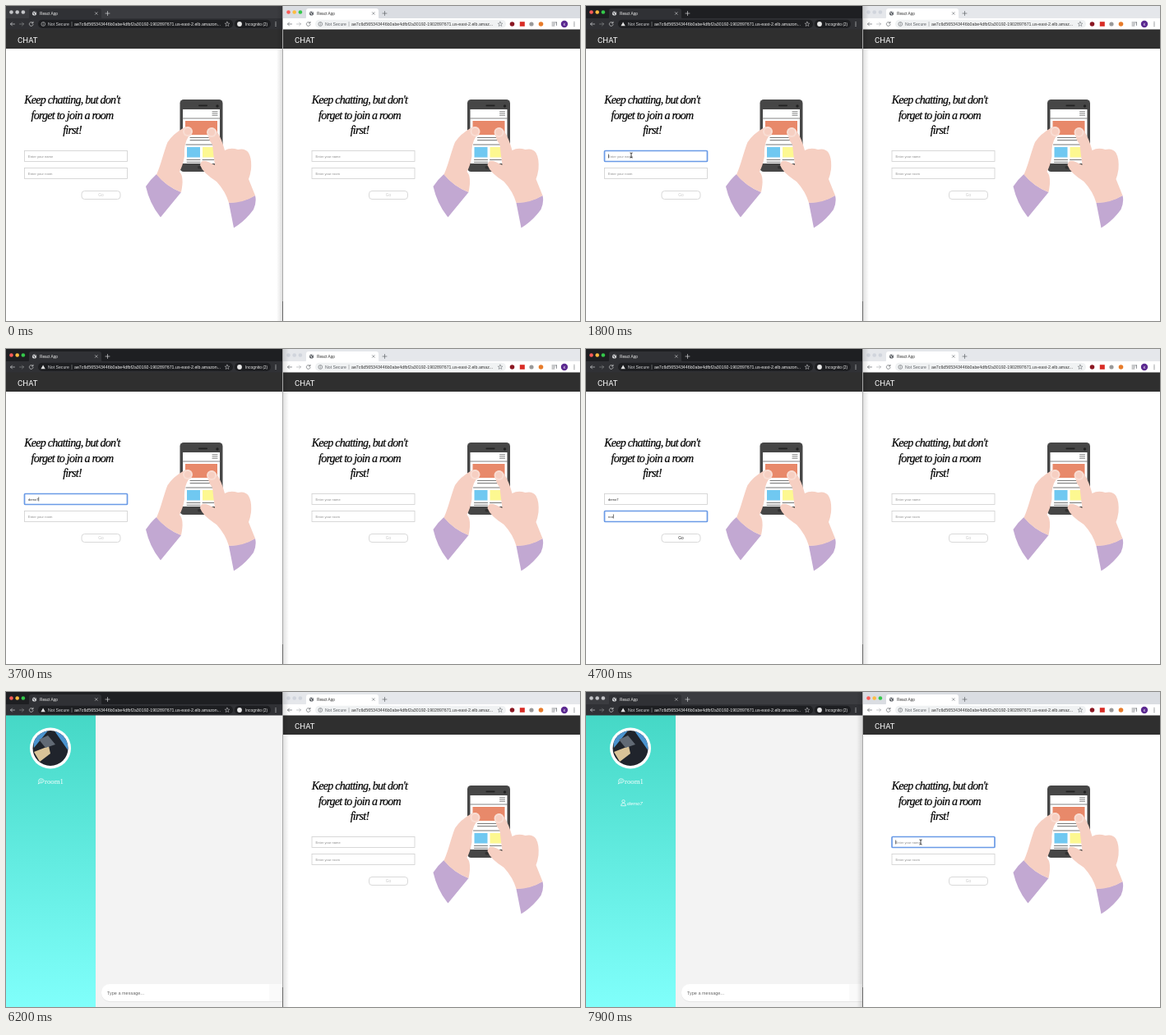
An HTML page for the animation above (8000 ms loop, 698 by 384 pixels).

```html
<!DOCTYPE html>
<html lang="en">
<head>
<meta charset="utf-8">
<title>Chat rooms</title>
<style>
  html, body { margin: 0; width: 100%; height: 100%; overflow: hidden; background: #fff; }
  svg { display: block; width: 698px; height: 384px; }
  text { font-family: "Liberation Sans", Arial, sans-serif; white-space: pre; }
  .bar { font-family: Roboto, sans-serif; font-size: 9.6px; fill: #fff; }
  .script text { font: italic 14px "Liberation Serif", serif; letter-spacing: -.75px; fill: #000; stroke: #000; stroke-width: .2; }
  .room { font-family: "Liberation Serif", serif; font-size: 8.8px; fill: #fff; }
  .line { fill: none; stroke-linecap: round; stroke-linejoin: round; }
</style>
</head>
<body>
<svg id="stage" viewBox="0 0 698 384" xmlns="http://www.w3.org/2000/svg"></svg>
<script>
const LOOP = 8000, STEP = 100;
const NAME = "demo7", ROOM = "room1";
const HOST = "ae7c6d565343446b0abe4dfbf2a30192-1902897671.us-east-2.elb.amaz";
const LIGHTS = ["#fc5b57", "#fdbc40", "#34c84a"];

// Times of the clicks, key presses and page changes, in ms
const leftClick = 1400, tabKey = 4000, enterChat = 6200, userJoins = 6400;
const rightActive = 7300, rightClick = 7500;
const nameKeys = [2900, 3000, 3200, 3300, 3600];
const roomKeys = [4400, 4600, 4700, 4900, 5700];

const rect = (x, y, w, h, fill, more = "") =>
  `<rect x="${x}" y="${y}" width="${w}" height="${h}" fill="${fill}" ${more}/>`;
const dot = (x, y, r, fill, more = "") =>
  `<circle cx="${x}" cy="${y}" r="${r}" fill="${fill}" ${more}/>`;
const label = (x, y, size, fill, str, more = "") =>
  `<text x="${x}" y="${y}" font-size="${size}" fill="${fill}" ${more}>${str}</text>`;
const shape = (d, fill, more = "") => `<path d="${d}" fill="${fill}" ${more}/>`;
const line = (d, color, w = .7, more = "") =>
  `<path class="line" d="${d}" stroke="${color}" stroke-width="${w}" ${more}/>`;

function phone() {
  const skin = "#f6cfc2", sleeve = "#c2a8d2", ink = "#464646";
  return rect(211.5, 114, 52, 88, ink, 'rx="4.5"') +
    rect(234, 120.5, 11, 1.7, "#222", 'rx=".8"') + dot(257, 122, 1.7, "#222") +
    rect(215, 126, 45, 66, "#fff") +
    line("M251 128.8h6M251 131h6M251 133.2h6", "#888", 1.1) +
    line("M215 137h45", "#777", .9) +
    rect(218, 140, 39, 17, "#e8896a") +
    line("M224 160.5h25M224 163.5h25M219 169h34", "#555", .8) +
    rect(220, 172, 16, 12.5, "#70c8f1") + rect(239, 172, 14, 12.5, "#fdf891") +
    line("M220 187.5h16M239 187.5h14M220 190.3h16", "#555", .8) +
    rect(233, 195, 9, 3.5, "#333", 'rx="1.7"') +
    shape("M183 205Q176 211 170 220Q175 242 188 257.5L213 227Q195 220 183 205Z", sleeve) +
    shape("M183 205.5C189 192 192 177 196.5 166Q203 156 216 148.5Q222 146 225 149Q228 155 222 159Q216 168 217 183Q215 195 211 202Q217 208 213 227Q195 220 183 205.5Z", skin) +
    dot(221, 153, 6, "#f9ddd3") + dot(221, 153, 4, skin) +
    shape("M271 240Q289 239 303 231Q305 239 301 248Q291 262 277 270.5Z", sleeve) +
    shape("M245 151Q251 145 256 152Q262 161 266 176Q273 172 282 175Q291 173 295 179Q299 186 298 199Q297 206 295 211L303 231Q289 240 271 240Q267 226 256 214Q239 203 236 194Q237 186 246 190L254 194Q252 180 251 169Q245 162 245 151Z", skin) +
    dot(250, 154, 6, "#f9ddd3") + dot(250, 154, 4, skin);
}

function field(id, y, hint) {
  return `<rect id="${id}Box" x="22.5" y="${y}" width="125" height="13" fill="#fff"/>` +
    label(27, y + 8.2, 4.1, "#888", hint, `id="${id}Text"`) +
    `<rect id="${id}Caret" x="27" y="${y + 4}" width=".6" height="5" fill="#111"/>`;
}

function landing(side, x, offset) {
  const heading = ["Keep chatting, but don't", "forget to join a room", "first!"]
    .map((s, i) => `<text x="80.5" y="${119 + i * 18.5}" text-anchor="middle">${s}</text>`).join("");
  return rect(x, 28, 362, 356, "#fff") + rect(x, 28, 362, 24, "#2f2f2f") +
    `<text class="bar" x="${x + 14}" y="44.5">CHAT</text>` +
    `<g transform="translate(${offset})"><g class="script">${heading}</g>` +
    field(side + "Name", 176.5, "Enter your name") + field(side + "Room", 197.5, "Enter your room") +
    rect(92, 225.5, 47, 10, "#fff", 'rx="3.5" stroke="#d0d0d0" stroke-width=".8"') +
    label(115.5, 232.3, 4.8, "#c8c8c8", "Go", `id="${side}Go" text-anchor="middle"`) +
    phone() + "</g>";
}

function chat() {
  return `<g id="chat">` + rect(0, 28, 336, 356, "#f3f3f3") + rect(0, 28, 109, 356, "url(#sea)") +
    dot(54, 68.5, 25, "#fff") +
    `<g clip-path="url(#face)">` + rect(32, 46, 44, 46, "#20242c") +
    shape("M32 46H52L34 68ZM58 46H76V72Z", "#4c94cf") +
    shape("M34 73L52 66L54 75L41 85Z", "#d9c398") +
    shape("M40 58L51 53L60 64L48 68Z", "#626a75") + "</g>" +
    line("M40 110.5Q38.5 105.8 42.5 105.8Q46.5 106 46 109Q44 111.4 41.5 110.8L39.3 111.8Z", "#fff", .7) +
    line("M41.2 107.8h3.4M41.2 109.2h2.6", "#fff", .4) +
    `<text class="room" x="47" y="111.8">${ROOM}</text>` +
    `<g id="member">` + dot(45.5, 133.2, 1.7, "none", 'stroke="#fff" stroke-width=".7"') +
    line("M42.6 138.3Q42.6 135.4 45.5 135.4Q48.4 135.4 48.4 138.3Z", "#fff") +
    label(50, 138, 6.2, "#fff", NAME, 'font-style="italic"') + "</g>" +
    rect(116, 357, 240, 21, "#e6e6e6", 'rx="10"') +
    rect(116, 356, 240, 21, "#fff", 'rx="10"') + rect(320, 356, 16, 21, "#fafafa") +
    label(123, 368.8, 5.5, "#666", "Type a message...") + "</g>";
}

function globe(x, color, land) {
  return dot(x, 9, 2.6, color) + line(`M${x - 1.6} 8.2l1.3 .5l.6 1.6M${x + .5} 7l1 1`, land, .8);
}

function chrome(side, x, tab, theme) {
  const { bar, pill, ink, dim, pillX, pillW, url, urlX, star } = theme;
  const tx = tab - 28, w = side === "l" ? 336 : 361;
  return `<rect id="${side}Strip" x="${x}" y="0" width="${w}" height="16"/>` +
    LIGHTS.map((c, i) => `<circle id="${side}Light${i}" cx="${x + 6.5 + i * 7.2}" cy="7.5" r="2.3"/>`).join("") +
    shape(`M${tab - 2} 16Q${tab} 16 ${tab} 13V6Q${tab} 3 ${tab + 3} 3H${tab + 85}Q${tab + 88} 3 ${tab + 88} 6V13Q${tab + 88} 16 ${tab + 90} 16Z`, bar) +
    globe(tx + 34.5, dim, bar) + label(tx + 41, 10.7, 4.75, ink, "React App") +
    line(`M${tx + 108.4} 7.6l2.8 2.8m0-2.8l-2.8 2.8`, dim, .6) +
    line(`M${tx + 121} 9h5M${tx + 123.5} 6.5v5`, dim) +
    rect(x, 15, w, 13.5, bar) +
    line(`M${x + 10.5} 22h-5m2-2l-2 2l2 2`, dim) +
    line(`M${x + 16.5} 22h5m-2-2l2 2l-2 2`, dim, .7, 'opacity=".5"') +
    line(`M${x + 32.6} 20.5a2.4 2.4 0 1 0 .5 2M${x + 33} 19.2v1.7h-1.7`, dim) +
    rect(pillX, 16.8, pillW, 10.2, pill, 'rx="5.1"') +
    `<g id="${side}Info">` + dot(urlX - 37.7, 22, 2.4, "none", `stroke="${dim}" stroke-width=".6"`) +
    line(`M${urlX - 37.7} 21.8v1.3m0-2.5v.1`, dim, .6) + "</g>" +
    label(urlX - 32, 23.9, 5.2, dim, "Not Secure") +
    line(`M${urlX - 3} 19.5v5`, dim, .4) +
    label(urlX, 23.9, 5.27, ink, url) +
    line(`M${star} 19.2l.8 1.9l2 .1l-1.5 1.3l.5 2l-1.8-1.1l-1.8 1.1l.5-2l-1.5-1.3l2-.1Z`, dim, .5) +
    [19.8, 22, 24.2].map(y => dot(side === "l" ? 328 : 691, y, .65, dim)).join("");
}

const leftTheme = { bar: "#303135", pill: "#1d1e21", ink: "#f0f0f0", dim: "#d2d3d5",
  pillX: 39, pillW: 237, url: HOST + "on...", urlX: 83, star: 269 };
const rightTheme = { bar: "#fff", pill: "#f0f2f3", ink: "#333", dim: "#5f6368",
  pillX: 376, pillW: 232, url: HOST + "...", urlX: 420, star: 601 };

const extras = rect(278, 16.8, 44, 10.2, "#1d1e21", 'rx="5.1"') +
  dot(284, 22, 2.9, "#e6e6e6") + label(291, 23.8, 4.9, "#eee", "Incognito (2)") +
  shape("M42.4 24.3l2.7-4.8l2.7 4.8Z", "#e2e2e2", 'id="warning"');
const addons = dot(615.5, 22, 2.8, "#8b1722") + rect(624.8, 19.2, 6, 5.6, "#d92c25") +
  dot(639, 22, 2.6, "#999") + dot(650.5, 22, 2.8, "#e77b2a") +
  line("M664 20h5.5M664 22h3.5M664 24h3M669.5 20v3.5", "#5f6368", .7) +
  dot(679, 22, 4.2, "#5c2a91") + label(679, 23.5, 4, "#fff", "K", 'text-anchor="middle"');

document.getElementById("stage").innerHTML = `<defs>
  <linearGradient id="sea" x1="0" y1="0" x2="0" y2="1"><stop stop-color="#45d8c6"/><stop offset="1" stop-color="#80fffb"/></linearGradient>
  <linearGradient id="shade"><stop stop-color="#000" stop-opacity="0"/><stop offset="1" stop-color="#000" stop-opacity=".12"/></linearGradient>
  <clipPath id="face"><circle cx="54" cy="68.5" r="21.5"/></clipPath>
  <clipPath id="leftSide"><path d="M0 0H336V384H0Z"/></clipPath></defs>` +
  `<g clip-path="url(#leftSide)">` + landing("l", 0, 0) + chat() + chrome("l", 0, 28, leftTheme) + extras + "</g>" +
  landing("r", 337, 349.5) + chrome("r", 337, 365, rightTheme) + addons +
  rect(336, 0, 1, 384, "#a8a8a8") + rect(336, 360, 1, 24, "#666") +
  rect(329, 0, 7, 384, "url(#shade)", 'id="shadeL"') +
  rect(-344, 0, 7, 384, "url(#shade)", 'id="shadeR" transform="scale(-1 1)"') +
  `<path id="arrow" d="M0 0V6.2L1.5 4.9L2.5 7.1L3.6 6.6L2.6 4.5H4.5Z" fill="#000" stroke="#fff" stroke-width=".5"/>` +
  line("M-1.2-3Q0-3 0-2.2Q0-3 1.2-3M0-2.2V2.2M-1.2 3Q0 3 0 2.2Q0 3 1.2 3", "#111", .8, 'id="beam"');

const $ = id => document.getElementById(id);
const set = (id, attrs) => { for (const k in attrs) $(id).setAttribute(k, attrs[k]); };
const show = (id, on) => set(id, { visibility: on ? "visible" : "hidden" });

function drawField(id, hint, word, keys, focusAt, blurAt, t) {
  const typed = keys.filter(k => k <= t), focused = t >= focusAt && t < blurAt;
  const text = $(id + "Text"), lastKey = Math.max(focusAt, ...typed);
  text.textContent = typed.length ? word.slice(0, typed.length) : hint;
  set(id + "Text", { fill: typed.length ? "#222" : "#888" });
  set(id + "Box", { stroke: focused ? "#6a9ae6" : "#cfcfcf", "stroke-width": focused ? 1.7 : .8,
    rx: focused ? 1 : 0 });
  show(id + "Caret", focused && (t - lastKey) % 1000 < 500);
  set(id + "Caret", { x: 27 + (typed.length ? text.getComputedTextLength() : 0) });
}

function drawWindow(side, lit, stripLit, colors) {
  LIGHTS.forEach((c, i) => set(side + "Light" + i, { fill: lit ? c : colors.off }));
  set(side + "Strip", { fill: stripLit ? colors.on : colors.idle });
}

const trips = [
  [[700, 300, 372], [1300, 55, 182], [2900, 55, 182]],
  [[6600, 55, 182], [7200, 470, 170], [7400, 394, 182.5], [7600, 407, 183], [LOOP, 407, 183]],
];

function pointer(t) {
  const path = trips.find(p => t >= p[0][0] && t < p[p.length - 1][0]);
  if (!path) return null;
  const i = path.findIndex(p => p[0] > t), [t0, x0, y0] = path[i - 1], [t1, x1, y1] = path[i];
  const u = (t - t0) / (t1 - t0), e = u * u * (3 - 2 * u);
  return [x0 + (x1 - x0) * e, y0 + (y1 - y0) * e];
}

function draw(t) {
  const leftLit = t >= leftClick && t < rightActive, inChat = t >= enterChat;
  drawWindow("l", leftLit, t >= leftClick && t < rightClick, { on: "#1e1f22", idle: "#3b3c40", off: "#c4c5c8" });
  drawWindow("r", !leftLit, !leftLit, { on: "#dadde2", idle: "#e5e7eb", off: "#d0d4dc" });
  show("lInfo", t < leftClick);
  show("warning", t >= leftClick);
  show("shadeL", !leftLit);
  show("shadeR", leftLit);

  drawField("lName", "Enter your name", NAME, nameKeys, leftClick, tabKey, t);
  drawField("lRoom", "Enter your room", ROOM, roomKeys, tabKey, enterChat, t);
  drawField("rName", "Enter your name", "", [], rightClick, LOOP, t);
  drawField("rRoom", "Enter your room", "", [], LOOP, LOOP, t);
  set("lGo", { fill: t >= roomKeys[0] ? "#222" : "#c8c8c8" });
  show("chat", inChat);
  show("member", t >= userJoins);

  const at = pointer(t), beam = (t >= leftClick && t < tabKey) || t >= rightClick;
  show("arrow", at && !beam);
  show("beam", at && beam);
  if (at) set(beam ? "beam" : "arrow", { transform: `translate(${at})` });
}

function tick() {
  draw(Math.floor(performance.now() % LOOP / STEP) * STEP);
  requestAnimationFrame(tick);
}
tick();
</script>
</body>
</html>
```
